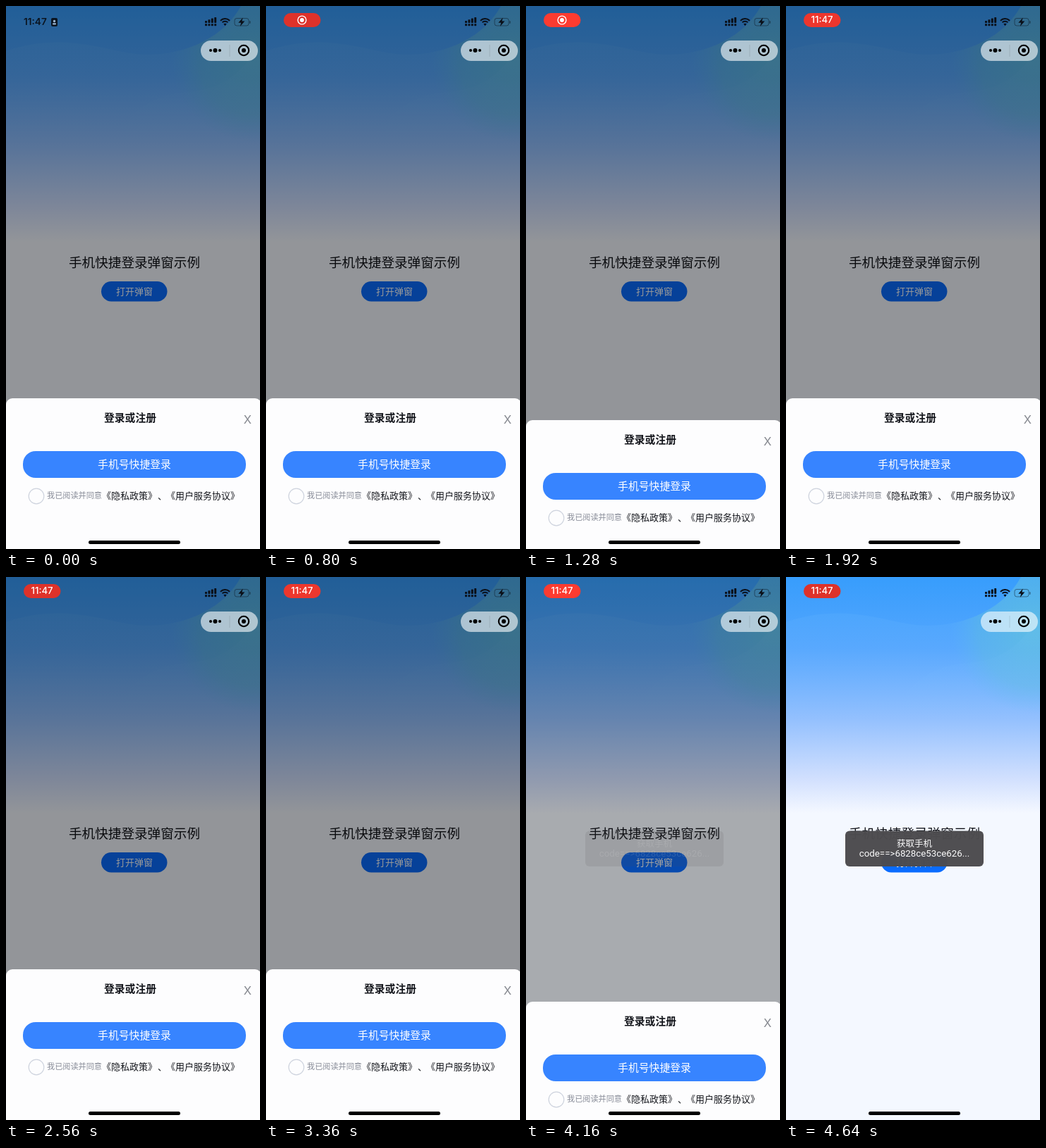
Write an HTML page with a canvas that moves like this. It is 360 px wide and 771 px high and loops after 4800 ms.

```html
<!DOCTYPE html>
<html lang="zh-CN">
<head>
<meta charset="utf-8">
<title>手机快捷登录弹窗示例</title>
<style>
  html, body { margin: 0; width: 100%; height: 100%; overflow: hidden; background: #f4f8ff; }
  canvas { display: block; width: 360px; height: 771px; }
</style>
</head>
<body>
<canvas></canvas>
<script>
const W = 360, H = 771, LOOP = 4800, STEP = 160, CX = 182;
const CJK = '"Noto Sans CJK SC", "Noto Sans CJK", sans-serif';
const canvas = document.querySelector('canvas');
const ctx = canvas.getContext('2d');
const dpr = window.devicePixelRatio || 1;
canvas.width = W * dpr;
canvas.height = H * dpr;

// ---- timing ----
const clamp = x => Math.max(0, Math.min(1, x));

// CSS "ease": cubic-bezier(.25, .1, .25, 1)
function ease(x) {
  const bezier = (a, b, s) => 3 * a * s * (1 - s) ** 2 + 3 * b * s * s * (1 - s) + s ** 3;
  let lo = 0, hi = 1;
  for (let i = 0; i < 20; i++) {
    const mid = (lo + hi) / 2;
    if (bezier(.25, .25, mid) < x) lo = mid; else hi = mid;
  }
  return bezier(.1, 1, lo);
}
const ramp = (t, start, duration) => ease(clamp((t - start) / duration));

// ---- drawing helpers ----
function text(str, x, y, size, color, { align = 'center', weight = 400, latin = 'Inter' } = {}) {
  ctx.font = `${weight} ${size}px ${latin}, ${CJK}`;
  ctx.textAlign = align;
  ctx.textBaseline = 'middle';
  ctx.fillStyle = color;
  ctx.fillText(str, x, y);
}
function box(x, y, w, h, radius, color) {
  ctx.fillStyle = color;
  ctx.beginPath();
  ctx.roundRect(x, y, w, h, radius);
  ctx.fill();
}
function disc(x, y, r, color) {
  ctx.fillStyle = color;
  ctx.beginPath();
  ctx.arc(x, y, r, 0, 7);
  ctx.fill();
}
function ring(x, y, r, color, width) {
  ctx.strokeStyle = color;
  ctx.lineWidth = width;
  ctx.beginPath();
  ctx.arc(x, y, r, 0, 7);
  ctx.stroke();
}
function shape(path, color) {
  ctx.fillStyle = color;
  ctx.fill(new Path2D(path));
}
function stops(gradient, list) {
  for (const [at, color] of list) gradient.addColorStop(at, color);
  return gradient;
}
function shade(alpha) {
  ctx.fillStyle = `rgba(0,0,0,${alpha})`;
  ctx.fillRect(0, 0, W, H);
}

// ---- scene parts ----
const sky = stops(ctx.createLinearGradient(0, 0, 0, 335), [
  [0, '#379dfc'], [.3, '#55a6fe'], [.6, '#93c0fe'], [.85, '#d0dffe'], [1, '#f4f8ff']]);
const glow = stops(ctx.createRadialGradient(352, 75, 10, 352, 75, 118), [
  [0, 'rgba(100,200,215,.6)'], [.65, 'rgba(95,190,222,.42)'], [1, 'rgba(95,185,240,0)']]);
const waveTint = stops(ctx.createLinearGradient(0, 0, 0, 200), [
  [0, 'rgba(130,200,255,.14)'], [1, 'rgba(130,200,255,0)']]);
const UPPER_WAVE = 'M0 64C70 40 120 56 170 66C235 78 305 52 333 0H360V200H0Z';
const LOWER_WAVE = 'M168 168C190 142 215 125 258 122C315 118 335 88 360 58V200H168Z';

function drawPage() {
  ctx.fillStyle = '#f4f8ff';
  ctx.fillRect(0, 0, W, H);
  ctx.fillStyle = sky;
  ctx.fillRect(0, 0, W, 335);
  shape(UPPER_WAVE, waveTint);
  shape(UPPER_WAVE, glow);
  shape(LOWER_WAVE, waveTint);

  text('手机快捷登录弹窗示例', CX, 365, 18.6, '#101218');
  box(135, 391, 93.5, 28.5, 14.25, '#0a6cff');
  text('打开弹窗', CX, 406, 13, '#fff');
}

function drawLoginSheet(offset) {
  ctx.save();
  ctx.translate(0, offset);
  box(0, 557, W + 2, 240, [9, 9, 0, 0], '#fdfdfe');
  text('登录或注册', 176, 586, 14.8, '#14161c', { weight: 600 });
  text('X', 342.5, 588, 16.5, '#85888f');
  box(24, 632, 316, 38, 18, '#3784ff');
  text('手机号快捷登录', CX, 652, 14.85, '#fff');
  ring(43, 696, 10.8, '#ced3de', 1.2);
  const left = { align: 'left' };
  text('我已阅读并同意', 58, 695.5, 11.15, '#888c98', left);
  text('《隐私政策》', 136, 696, 13, '#14161c', left);
  text('、', 215, 696, 13, '#14161c', left);
  text('《用户服务协议》', 227, 696, 13, '#14161c', left);
  ctx.restore();
}

function drawToast(alpha) {
  ctx.globalAlpha = alpha;
  box(84, 360.5, 196, 50.5, 6, '#4d4c4f');
  text('获取手机', CX, 379, 12.5, '#fff');
  text('code==>6828ce53ce626...', CX, 393.5, 13.3, '#fff', { latin: 'Roboto' });
  ctx.globalAlpha = 1;
}

function drawCapsule() {
  box(276, 49, 81, 29, 14.5, 'rgba(255,255,255,.6)');
  ctx.fillStyle = 'rgba(0,0,0,.1)';
  ctx.fillRect(316.5, 55, 1, 17);
  disc(290, 63, 2, '#000');
  disc(296.5, 63, 3, '#000');
  disc(303, 63, 2, '#000');
  ring(337, 63, 7.2, '#000', 2.1);
  disc(337, 63, 3, '#000');
}

function drawPhoneSheet(offset) {
  ctx.save();
  ctx.translate(0, offset);
  const left = { align: 'left' }, leftBold = { align: 'left', weight: 600 };
  box(0, 298, W + 2, 480, [11, 11, 0, 0], '#f8f6fb');
  disc(34, 338, 7, '#a39c9c');
  text('QZV事务工具', 53, 338, 13.8, '#121316', leftBold);
  ring(332, 338, 7.3, '#b4b4ba', 1);
  disc(332, 334.6, .9, '#a9a9b0');
  ctx.fillStyle = '#a9a9b0';
  ctx.fillRect(331.5, 337, 1, 5);
  text('申请获取并验证你的手机号', 23, 376, 15.75, '#121316', leftBold);
  text('用户登录，绑定用户信息', 23, 399.5, 13, '#8b8b91', left);

  box(22, 430, 320, 130, 8, '#fff');
  box(22, 572, 320, 65, 8, '#fff');
  ctx.fillStyle = '#f1f0f4';
  ctx.fillRect(22, 496, 320, 1);
  text('100****5293', CX, 455, 15.4, '#1b1c20');
  text('上次提供', CX, 475.5, 11, '#56697a');
  text('101****4138', CX, 529, 15.4, '#1b1c20');
  text('不允许', CX, 605, 16, '#1b1c20');
  text('管理号码', CX, 697.5, 13, '#566070');
  ctx.restore();
}

function drawClock(t) {
  if (t < 320) {
    text('11:47', 25, 23, 13.6, '#0b1420', { align: 'left', weight: 600 });
    box(64, 17, 9, 12, 2, '#0b1420');
    disc(68.5, 21.5, 1.7, '#9db6d0');
    box(66, 24.2, 5, 2.3, 1, '#9db6d0');
    return;
  }
  const pulse = clamp(.5 + Math.sin(2 * Math.PI * t / 960) * .6);
  box(25, 10, 52.5, 20, 10, `rgb(${222 + 30 * pulse},${50 + 9 * pulse},${42 + 6 * pulse})`);
  if (t < 1920) {
    ring(51, 20, 5.9, '#fff', 1.4);
    disc(51, 20, 2.9, '#fff');
  } else {
    text('11:47', 51, 20.3, 13.2, '#fff', { weight: 500 });
  }
}

function drawStatusIcons() {
  for (let i = 0; i < 4; i++) {
    const x = 282 + i * 4.4, height = 3 + i * 1.7;
    box(x, 24 - height, 3, height, .8, '#0a0f18');
    box(x, 25.3, 3, 3, .8, '#0a0f18');
  }
  // Wi-Fi fan
  ctx.strokeStyle = '#0a0f18';
  ctx.lineWidth = 2;
  for (const r of [5.3, 9]) {
    ctx.beginPath();
    ctx.arc(310.5, 27, r, -Math.PI * .76, -Math.PI * .24);
    ctx.stroke();
  }
  shape('M310.5 28.2L308.4 25.6Q310.5 23.8 312.6 25.6Z', '#0a0f18');
  // Battery
  ctx.strokeStyle = 'rgba(10,15,24,.45)';
  ctx.lineWidth = 1;
  ctx.beginPath();
  ctx.roundRect(324, 17.5, 20, 10.5, 3);
  ctx.stroke();
  box(345, 21, 1.5, 4, .7, 'rgba(10,15,24,.45)');
  shape('M335.8 16.5L329.3 23.8H333.2L331.8 29L338.4 21.6H334.4Z', '#0a0f18');
}

function render(t) {
  const SHEET = 214, PHONE = 473;
  const firstClose = ramp(t, 880, 240);
  const reopen = ramp(t, 1112, 300);
  const finalClose = ramp(t, 4111, 300);
  const sheetOpen = t < 1112 ? 1 - firstClose : reopen - finalClose;
  const maskOpen = t < 1112 ? 1 - firstClose : ramp(t, 1112, 180) - finalClose;
  const phoneOpen = ramp(t, 3440, 240) - ramp(t, 3930, 200);

  ctx.setTransform(dpr, 0, 0, dpr, 0, 0);
  drawPage();
  shade(.4 * maskOpen);
  if (sheetOpen > 0) drawLoginSheet(Math.round(SHEET * (1 - sheetOpen)));
  if (t >= 4160) drawToast(.12 + .86 * clamp((t - 4160) / 150));
  drawCapsule();
  if (phoneOpen > 0) {
    shade(.3 * phoneOpen);
    drawPhoneSheet(PHONE * (1 - phoneOpen));
  }
  drawClock(t);
  drawStatusIcons();
  box(117, 759, 130, 5, 2.5, '#000');
}

const startTime = performance.now();
function tick() {
  const elapsed = (performance.now() - startTime) % LOOP;
  render(Math.floor(elapsed / STEP) * STEP);
  requestAnimationFrame(tick);
}
tick();
</script>
</body>
</html>
```
